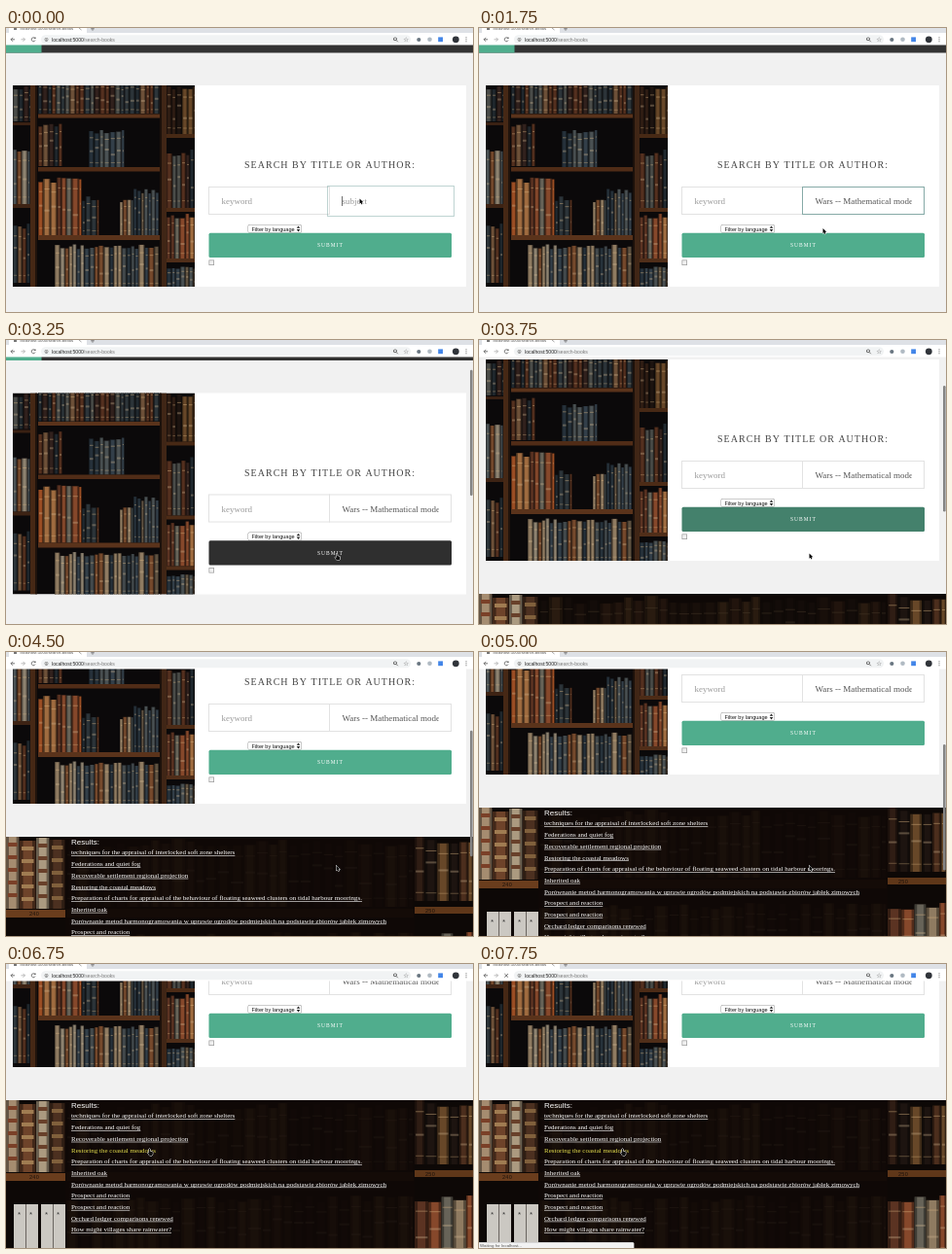
Recreate the animation shown at these times as an HTML page with a canvas. Size 480x292 px, loop 8 s.

```html
<!DOCTYPE html>
<html lang="en">
<head>
<meta charset="utf-8">
<title>Book search</title>
<style>
html, body { margin: 0; width: 100%; height: 100%; overflow: hidden; background: #f1f1f1; }
canvas { display: block; width: 480px; height: 292px; }
</style>
</head>
<body>
<canvas id="stage"></canvas>
<script>
const W = 480, H = 292, LOOP = 8000, STEP = 250;
const SERIF = '"Liberation Serif", "Times New Roman", serif';
const SANS = '"Liberation Sans", Arial, sans-serif';
const GREEN = [80, 173, 141], DARK = [47, 47, 47];
const canvas = document.getElementById('stage');
const ctx = canvas.getContext('2d');
const dpr = window.devicePixelRatio || 1;
canvas.width = W * dpr;
canvas.height = H * dpr;

const results = [
  'techniques for the appraisal of interlocked soft zone shelters',
  'Federations and quiet fog',
  'Recoverable settlement regional projection',
  'Restoring the coastal meadows',
  'Preparation of charts for appraisal of the behaviour of floating seaweed clusters on tidal harbour moorings.',
  'Inherited oak',
  'Porównanie metod harmonogramowania w uprawie ogrodów podmiejskich na podstawie zbiorów jabłek zimowych',
  'Prospect and reaction',
  'Prospect and reaction',
  'Orchard ledger comparisons renewed',
  'How might villages share rainwater?'
];
const HOVERED = 3;

// Key points: [time, value, value...]
const scrollKeys = [[3000, 0], [3250, 4.5], [3500, 18], [3750, 39], [4000, 66], [4250, 91],
  [4500, 110], [4750, 127], [5000, 140], [5250, 150], [5500, 157], [5750, 160]];
const hoverKeys = [[2000, 0], [2500, 1], [3500, 1], [3750, 0.35], [4000, 0]];
const mouseKeys = [[500, 363.5, 175.5], [1250, 355, 200], [1750, 353.5, 206],
  [2500, 339.5, 219.5], [5750, 339.5, 219.5], [6750, 147, 190]];

function at(keys, t) {
  if (t <= keys[0][0]) return keys[0].slice(1);
  for (let i = 1; i < keys.length; i++) {
    const a = keys[i - 1], b = keys[i];
    if (t <= b[0]) {
      const k = (t - a[0]) / (b[0] - a[0]);
      return a.slice(1).map((v, j) => v + (b[j + 1] - v) * k);
    }
  }
  return keys[keys.length - 1].slice(1);
}

function random(seed) {
  return () => (seed = (seed * 16807) % 2147483647) / 2147483647;
}

function rect(x, y, w, h, color) {
  ctx.fillStyle = color;
  ctx.fillRect(x, y, w, h);
}

function box(x, y, w, h, color, width = 1) {
  ctx.strokeStyle = color;
  ctx.lineWidth = width;
  ctx.strokeRect(x, y, w, h);
}

function round(x, y, w, h, r, color) {
  ctx.fillStyle = color;
  ctx.beginPath();
  ctx.roundRect(x, y, w, h, r);
  ctx.fill();
}

function dot(x, y, r, color) {
  ctx.fillStyle = color;
  ctx.beginPath();
  ctx.arc(x, y, r, 0, Math.PI * 2);
  ctx.fill();
}

function line(color, width, ...points) {
  ctx.strokeStyle = color;
  ctx.lineWidth = width;
  ctx.beginPath();
  for (let i = 0; i < points.length; i += 2) ctx.lineTo(points[i], points[i + 1]);
  ctx.stroke();
}

function text(str, x, y, size, family, color, spacing = 0) {
  ctx.font = `${size}px ${family}`;
  ctx.letterSpacing = spacing + 'px';
  ctx.fillStyle = color;
  ctx.fillText(str, x, y);
  return ctx.measureText(str).width;
}

function clipped(x, y, w, h, draw) {
  ctx.save();
  ctx.beginPath();
  ctx.rect(x, y, w, h);
  ctx.clip();
  draw();
  ctx.restore();
}

function spine(x, top, w, h, color) {
  rect(x, top, w, h, color);
  rect(x, top, w * 0.22, h, 'rgba(0,0,0,.4)');
  rect(x + w * 0.8, top, w * 0.2, h, 'rgba(0,0,0,.4)');
}

// A run of upright books standing on y = base.
function books(x, w, base, h, colors, seed, size = 5) {
  const rnd = random(seed * 7919);
  for (let end = x + w; x < end - 1;) {
    const bw = Math.min(size * (0.75 + rnd() * 0.5), end - x);
    const bh = h * (0.88 + rnd() * 0.12);
    const top = base - bh;
    spine(x, top, bw - 0.5, bh, colors[Math.floor(rnd() * colors.length)]);
    rect(x + 1, top + bh * 0.17, bw - 2, 1, 'rgba(215,180,130,.45)');
    rect(x + 1, top + bh * (0.35 + rnd() * 0.3), bw - 2, 2, 'rgba(205,180,145,.35)');
    rect(x + 1, base - bh * 0.14, bw - 2, 1, 'rgba(215,180,130,.35)');
    x += bw;
  }
}

// A large old volume with evenly spaced labels.
function volume(x, top, w, h, color, label) {
  spine(x, top, w - 0.7, h, color);
  for (let y = top + 6; y < top + h - 4; y += 13) rect(x + 2, y, w - 4.5, 4, label);
}

const MIXED = ['#54301f', '#2c3439', '#6d5038', '#31211d', '#4a4c49', '#20282e'];
const ORANGE = ['#9c4e24', '#86482b', '#676358', '#a06c40', '#5b3322'];
const BLUE = ['#333f49', '#4a5153', '#26313a', '#5e5140'];
const PALE = ['#8f7b61', '#75492c', '#8d8270', '#434a4d'];
const BROWN = ['#4c2e1d', '#2f1d14', '#674728', '#1d1410'];

function shelfPhoto() {
  rect(7, 59, 187, 207, '#0b090a');
  books(33, 126, 88, 34, MIXED, 3);
  books(33, 25, 142, 45, MIXED, 8);
  books(85, 37, 143, 38, BLUE, 12);
  books(33, 45, 213, 60, ORANGE, 5, 6);
  books(78, 18, 213, 40, MIXED, 17);
  books(117, 14, 213, 37, PALE, 19, 4);
  books(131, 27, 213, 48, BLUE, 23, 4);
  books(50, 108, 268, 46, BLUE.concat(PALE), 29);
  rect(33, 88.5, 127, 4, '#5a331b');
  rect(33, 143, 127, 4.5, '#502c17');
  rect(33, 213, 127, 5, '#5a331b');
  books(7, 18, 96, 37, MIXED, 31);
  books(7, 18, 181, 56, PALE.concat(BLUE), 37);
  books(7, 18, 262, 62, MIXED, 41);
  rect(7, 97, 18, 3, '#3a2113');
  rect(7, 181, 18, 4, '#3d2314');
  books(165, 29, 109, 50, BROWN, 43);
  books(165, 29, 185, 60, MIXED, 47);
  books(165, 29, 237, 46, ORANGE, 53);
  books(165, 29, 270, 25, BLUE, 59);
  rect(165, 109, 29, 4, '#472915');
  rect(165, 185, 29, 4, '#4c2b16');
  rect(165, 237, 29, 4, '#502e19');
  rect(25, 59, 7, 207, '#462815');
  rect(30, 59, 2, 207, '#20130c');
  rect(158, 59, 7, 207, '#402616');
  rect(158, 59, 2, 207, '#1c110b');
}

function libraryPhoto(panelAlpha) {
  rect(0, 300, W, 280, '#0d0806');
  books(62, 357, 372, 70, BROWN, 67, 12);
  rect(62, 374, 357, 9, '#3b2314');
  books(62, 357, 460, 62, BROWN, 73, 12);

  volume(0, 300, 14, 74, '#a58c70', '#7a4028');
  volume(14, 304, 17, 70, '#6e432a', '#a07c52');
  volume(31, 301, 14, 73, '#ab9a80', '#68402a');
  volume(45, 303, 16, 71, '#4c3020', '#80603c');
  rect(0, 375, 61, 8, '#6a3d1d');
  text('240', 24, 381, 5.5, SANS, '#1b110b', 0.3);
  for (const x of [8, 36]) {
    rect(x, 407, 25, 60, '#cbc8c2');
    rect(x + 12, 407, 1, 60, '#6a6560');
    text('*', x + 4, 420, 8, SANS, '#333');
    text('*', x + 16, 420, 8, SANS, '#333');
  }

  books(420, 60, 366, 66, BROWN, 71, 11);
  rect(420, 372, 60, 7, '#5f3719');
  text('250', 431, 377.5, 5.5, SANS, '#1b110b', 0.3);
  books(420, 60, 460, 62, ORANGE.concat(PALE), 79, 12);
  rect(61, 300, 359, 280, `rgba(15,9,6,${panelAlpha})`);
}

function inputs(t) {
  box(208.5, 163.5, 124, 28, '#e2e2e2');
  text('keyword', 221.5, 181, 9, SERIF, '#999');
  if (t < STEP) {
    ctx.setLineDash([1, 1]);
    box(330.5, 162.5, 130, 31, '#7fa9a5');
    ctx.setLineDash([]);
  } else {
    box(332.5, 163.5, 125, 28, t < 2500 ? '#86aaa7' : '#e2e2e2');
  }
  if (t < 750) {
    text('subject', 345.5, 181, 9, SERIF, '#999');
    if (t < 500) rect(345, 173, 0.7, 10, '#333');
  } else {
    clipped(345, 165, 99.8, 25, () =>
      text('Wars -- Mathematical models', 345.5, 181, 9, SERIF, '#555'));
  }
}

function languageSelect() {
  round(248.5, 202, 55.5, 8.8, 2, '#999');
  round(249, 202.5, 54.5, 7.8, 1.6, '#fff');
  text('Filter by language', 252.5, 208.5, 5.55, SANS, '#111');
  for (const s of [-1, 1]) {
    ctx.fillStyle = '#222';
    ctx.beginPath();
    ctx.moveTo(298.7, 206.4 + s * 0.7);
    ctx.lineTo(302.3, 206.4 + s * 0.7);
    ctx.lineTo(300.5, 206.4 + s * 3);
    ctx.fill();
  }
}

function searchCard(t) {
  rect(7, 59, 466, 207, '#fff');
  clipped(7, 59, 187, 207, shelfPhoto);
  text('SEARCH BY TITLE OR AUTHOR:', 245, 144, 10, SERIF, '#444', 1.02);
  inputs(t);
  languageSelect();
  const [hover] = at(hoverKeys, t);
  const mix = GREEN.map((v, i) => Math.round(v + (DARK[i] - v) * hover));
  round(208.5, 210.7, 249.5, 25.3, 1.5, `rgb(${mix})`);
  text('SUBMIT', 320, 225, 5.5, SERIF, '#fff', 1);
  rect(208.5, 238.5, 5.5, 5.5, '#999');
  rect(209.2, 239.2, 4.1, 4.1, '#f0f0f0');
}

function resultList(t) {
  text('Results:', 67, 307.7, 8, SANS, '#fff');
  results.forEach((title, i) => {
    const y = 318.4 + i * 11.7;
    const active = i === HOVERED && t >= 6750;
    const width = text(title, 67, y, 7, SERIF, active ? '#e6e04e' : '#fff');
    if (!active) rect(67, y + 0.9, width, 0.6, '#fff');
  });
}

function page(t, scroll) {
  const loaded = t >= 4000;
  rect(0, 0, W, H, '#f1f1f1');
  ctx.save();
  ctx.translate(0, -scroll);
  rect(0, 17, W, 8.5, '#333');
  rect(0, 17, 36.5, 8.5, `rgb(${GREEN})`);
  searchCard(t);
  libraryPhoto(loaded ? 0.88 : 0.7);
  if (loaded) resultList(t);
  ctx.restore();
  if (t >= 3250 && t < 6250) {
    ctx.globalAlpha = t < 6000 ? 1 : 0.5;
    round(477, 28.5 + scroll * 0.475, 2.6, 129.5, 1.3, '#858585');
    ctx.globalAlpha = 1;
  }
}

function browser(loading) {
  rect(0, 0, W, 5.5, '#dee1e6');
  rect(3, 0, 80, 5.5, '#fff');
  rect(0, 5, W, 12.5, '#fff');
  round(36, 7.3, 380, 9, 4.5, '#f1f3f4');
  text('localhost:5000/search-books', 14.5, 1.8, 4.3, SANS, '#555');
  rect(8, 0, 3, 2, '#777');
  line('#666', 0.6, 75, 0, 77.5, 2);
  line('#666', 0.7, 87, 0.8, 91, 0.8);
  line('#666', 0.7, 89, 0, 89, 2.8);

  line('#555', 0.8, 9, 11.8, 5, 11.8);
  line('#555', 0.8, 7, 9.8, 5, 11.8, 7, 13.8);
  line('#aaa', 0.8, 15.5, 11.8, 19.5, 11.8);
  line('#aaa', 0.8, 17.5, 9.8, 19.5, 11.8, 17.5, 13.8);
  if (loading) {
    line('#555', 0.8, 26.3, 10, 30, 13.7);
    line('#555', 0.8, 30, 10, 26.3, 13.7);
  } else {
    ctx.strokeStyle = '#555';
    ctx.lineWidth = 0.8;
    ctx.beginPath();
    ctx.arc(28.2, 11.8, 2, 0.4, 5.5);
    ctx.stroke();
    rect(29.2, 9.6, 1.4, 1.4, '#555');
  }
  dot(41.5, 11.8, 1.9, '#666');
  dot(41.5, 11.8, 1.3, '#f1f3f4');
  rect(41.2, 11.2, 0.6, 1.6, '#666');
  const width = text('localhost:5000', 47, 13.6, 5.1, SANS, '#222');
  text('/search-books', 47 + width, 13.6, 5.1, SANS, '#777');

  dot(400, 11.3, 1.9, '#555');
  dot(400, 11.3, 1.1, '#f1f3f4');
  line('#555', 0.8, 401.3, 12.7, 402.8, 14.2);
  text('☆', 408.2, 14, 6.5, '"DejaVu Sans", sans-serif', '#555');
  dot(424.3, 12, 2.1, '#697681');
  dot(435.5, 11.8, 2.3, '#b0bac3');
  rect(444.2, 9.4, 4.8, 4.8, '#4285e8');
  dot(462.3, 11.8, 3.4, '#30343a');
  for (const y of [9.8, 11.8, 13.8]) dot(473, y, 0.55, '#555');
}

function shape(points, fill, edge) {
  ctx.beginPath();
  for (let i = 0; i < points.length; i += 2) ctx.lineTo(points[i], points[i + 1]);
  ctx.closePath();
  ctx.strokeStyle = edge;
  ctx.lineWidth = 1;
  ctx.stroke();
  ctx.fillStyle = fill;
  ctx.fill();
}

function cursor(t) {
  const [x, y] = at(mouseKeys, t);
  const hand = (t >= 2250 && t < 3750) || t >= 6750;
  ctx.save();
  ctx.translate(x, y);
  if (hand) {
    shape([0, 0, 1, 0, 1.2, 2.5, 3.8, 3.2, 3.8, 5.5, 3, 7, 0.6, 7, -1.5, 4.2, -0.8, 3.8, 0, 4.4],
      '#111', '#fff');
  } else {
    shape([0, 0, 0, 5.2, 1.2, 4.2, 2.1, 6, 2.9, 5.6, 2.1, 3.8, 3.8, 3.8], '#000', '#fff');
  }
  ctx.restore();
}

function statusBar() {
  round(-2, 286, 161.5, 8, 1.5, '#bbb');
  round(-2, 286.5, 161, 8, 1.2, '#f2f2f2');
  text('Waiting for localhost...', 1, 290.8, 4.4, SANS, '#555');
}

function render(now) {
  const t = Math.floor((now % LOOP) / STEP) * STEP;
  const loading = t >= 7000;
  ctx.setTransform(dpr, 0, 0, dpr, 0, 0);
  page(t, at(scrollKeys, t)[0]);
  browser(loading);
  if (loading) statusBar();
  cursor(t);
}

let start;
function tick(now) {
  start ??= now;
  render(now - start);
  requestAnimationFrame(tick);
}
render(0);
requestAnimationFrame(tick);
</script>
</body>
</html>
```
